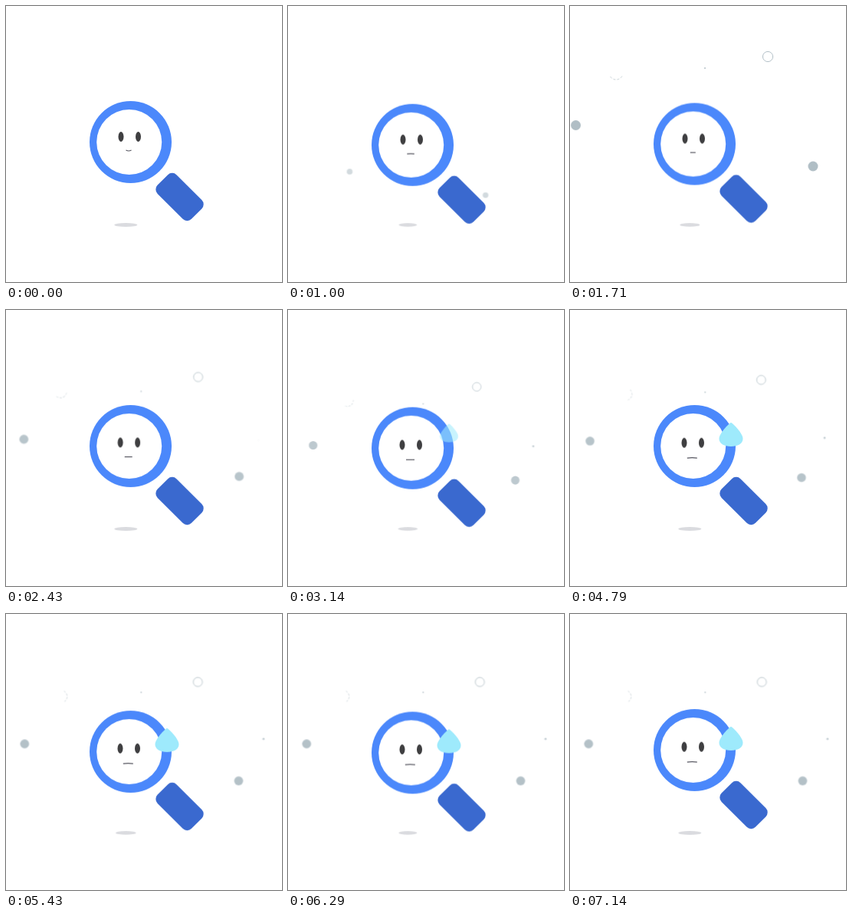
An HTML page without scripts for the animation above (7.21 s loop, 360x360 px).

```html
<!DOCTYPE html>
<html lang="en">
<head>
<meta charset="utf-8">
<title>Magnifier</title>
<style>
  :root { --loop: 7210ms; --grey: #b0bec5; }
  html, body { margin: 0; width: 100%; height: 100%; overflow: hidden; background: #fff; }
  svg { display: block; width: 100%; height: 100%; }

  /* three full bobs per loop */
  .bob, .shadow {
    animation: bob calc(var(--loop) / 6) cubic-bezier(.37, 0, .63, 1) infinite alternate;
  }
  .shadow { animation-name: squeeze; transform-origin: 156.3px 285.5px; }
  @keyframes bob { to { transform: translateY(4px); } }
  @keyframes squeeze { to { transform: scale(.78, .92); } }

  .burst, .outline, .speck, .far, .arc, .eyes, .mouth, .drop {
    animation: var(--loop) linear infinite;
  }

  /* particles spread from one point, then settle */
  .burst { animation-name: burst; transform-origin: 178px 297px; }
  @keyframes burst {
    0% { transform: scale(0); opacity: 0; }
    13.87% { transform: scale(.572); opacity: .57; }
    23.72% { transform: scale(1); opacity: 1; }
    32.73% { transform: scale(.913); opacity: .9; }
    43.55% { transform: scale(.852); opacity: .83; }
    57.42% { transform: scale(.877); opacity: .86; }
    65.3% { transform: scale(.89); opacity: .9; }
    75.3%, 100% { transform: scale(.902); opacity: .95; }
  }
  .outline { animation-name: appear; }
  @keyframes appear { 0%, 15% { opacity: 0; } 21%, 100% { opacity: 1; } }

  .speck { animation-name: speck; }
  @keyframes speck {
    0%, 23.72%, 75.3%, 100% { transform: none; }
    43.55% { transform: translateY(11px); }
  }
  .far { animation-name: far; }
  @keyframes far {
    0%, 33% { opacity: 0; transform: translate(-8.5px, 8.5px); }
    43.55% { opacity: 1; transform: translate(-8.5px, 8.5px); }
    57.42% { transform: translate(-4.5px, 5px); }
    75.3%, 100% { opacity: 1; transform: none; }
  }
  .arc { animation-name: turn; transform-origin: 60px 87px; }
  @keyframes turn {
    0%, 23.72% { transform: rotate(90deg); }
    75.3%, 100% { transform: none; }
  }

  .eyes { animation-name: look; }
  @keyframes look {
    0%, 27% { transform: none; animation-timing-function: ease-in-out; }
    36%, 100% { transform: translate(-1px, 2.7px); }
  }
  .mouth { animation-name: mouth; }
  @keyframes mouth {
    0% { d: path("M156.5 188 Q160 190 163.5 188"); }
    13.87% { d: path("M155.3 189.2 Q160 188.4 164.8 189.2"); }
    23.72%, 27% { d: path("M156.8 188.6 Q160.3 188.6 163.8 188.6"); }
    36%, 43.55% { d: path("M154 192.5 Q159.5 192.5 165 192.5"); }
    57.42%, 100% { d: path("M152.8 193.2 Q159.3 192 165.8 193.2"); }
  }

  .drop { animation-name: drop; transform-origin: 210px 142px; }
  @keyframes drop {
    0%, 38% { transform: scale(.4); opacity: 0; }
    43.55% { transform: scale(.77); opacity: .57; }
    48%, 100% { transform: none; opacity: 1; }
  }
</style>
</head>
<body>
<svg viewBox="0 0 360 360">
  <ellipse class="shadow" cx="156.3" cy="285.5" rx="15" ry="2.5" fill="#dadbdf"/>

  <g class="burst" fill="var(--grey)">
    <circle cx="7.5" cy="155.5" r="6.5"/>
    <circle cx="317" cy="209" r="6.5"/>
    <g class="outline" fill="none" stroke="var(--grey)">
      <circle cx="258" cy="66" r="6.6"/>
      <path class="arc" d="M64.5 79.2 A9 9 0 0 1 64.5 94.8" stroke="#c6d0d5" stroke-dasharray="3 2"/>
    </g>
    <circle class="speck" cx="176" cy="81" r="1"/>
    <circle class="far" cx="353" cy="148.5" r="1.4"/>
  </g>

  <g class="bob">
    <rect x="-31.3" y="-17.5" width="62.6" height="35" rx="8" fill="#3a69cf"
          transform="translate(226.5 249) rotate(45)"/>
    <circle cx="162.5" cy="177.5" r="53.5" fill="#4b88fb"/>
    <circle cx="160.7" cy="177.5" r="42.5" fill="#fff"/>
    <g class="eyes" fill="#3f3f41">
      <ellipse cx="150" cy="170.5" rx="3.5" ry="6.5"/>
      <ellipse cx="172.5" cy="170.5" rx="3.5" ry="6.5"/>
    </g>
    <path class="mouth" d="M156.5 188 Q160 190 163.5 188" fill="none" stroke="#55555f" stroke-width="1.2"/>
    <path class="drop" fill="#9eeafc"
          d="M210 146.8 C213 148.5 225.5 161 225.5 168 C225.5 174.5 218.5 178 210 178 C201.500 178 194.500 174.500 194.500 168 C194.500 161 207 148.500 210 146.800 Z"/>
  </g>
</svg>
</body>
</html>
```
